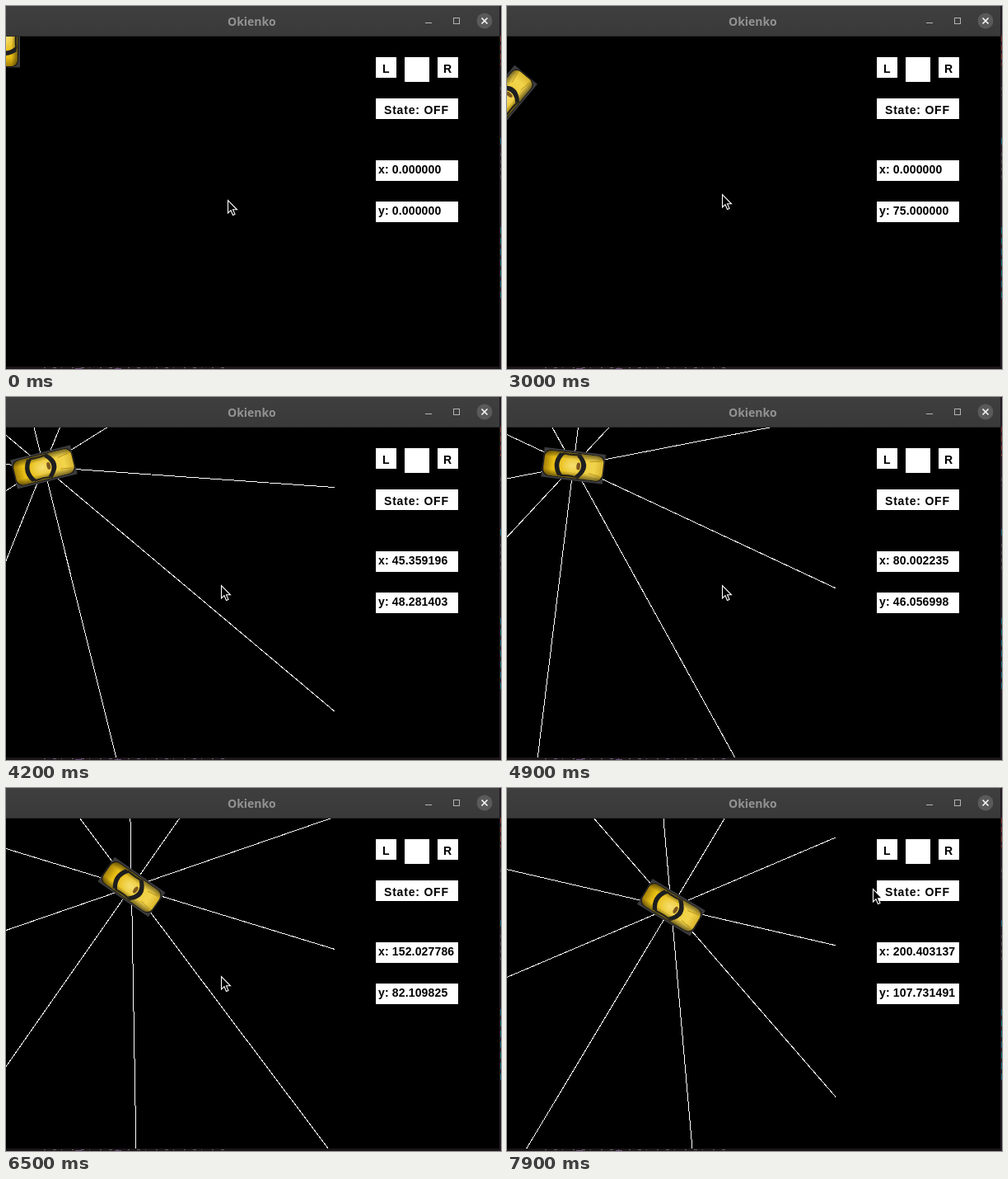
These frames come from a looping animation (601x440 px, 8000 ms). An HTML page:

```html
<!DOCTYPE html>
<html lang="pl">
<head>
<meta charset="utf-8">
<title>Okienko</title>
<style>
  html, body { margin: 0; width: 100%; height: 100%; overflow: hidden; background: #000; }
  svg { display: block; width: 601px; height: 440px; }
  .label { font: bold 14px "Liberation Sans", Arial, sans-serif; letter-spacing: .15px; white-space: pre; }
  .title { font: bold 14px "Open Sans", "Noto Sans", sans-serif; fill: #929292; }
  .crisp { shape-rendering: crispEdges; }
</style>
</head>
<body>
<svg viewBox="0 0 601 440">
  <defs>
    <linearGradient id="bar" x2="0" y2="1">
      <stop stop-color="#3f3f3f"/><stop offset="1" stop-color="#393939"/>
    </linearGradient>
    <linearGradient id="paint" x2="0" y2="1">
      <stop stop-color="#d8b52c"/><stop offset=".15" stop-color="#f2d44c"/>
      <stop offset=".5" stop-color="#ecc832"/><stop offset=".85" stop-color="#e8be14"/>
      <stop offset="1" stop-color="#a58008"/>
    </linearGradient>
    <linearGradient id="shade">
      <stop stop-color="#000" stop-opacity=".5"/><stop offset=".25" stop-color="#000" stop-opacity="0"/>
      <stop offset=".75" stop-color="#000" stop-opacity="0"/><stop offset="1" stop-color="#000" stop-opacity=".5"/>
    </linearGradient>
    <radialGradient id="shine">
      <stop stop-color="#fff2a8" stop-opacity=".55"/><stop offset="1" stop-color="#fff2a8" stop-opacity="0"/>
    </radialGradient>
    <clipPath id="view"><rect y="37" width="599" height="400"/></clipPath>
  </defs>

  <rect width="601" height="440"/>
  <g class="crisp">
    <rect y="437" width="601" height="3" fill="#1c1519"/>
    <rect x="599" width="2" height="440" fill="#241a22"/>
    <path d="M600.500 36v36" stroke="#7c3020" stroke-dasharray="7 4"/>
    <path d="M600.500 98v10M600.500 178v34" stroke="#4a4240" stroke-dasharray="4 5"/>
    <path d="M600.500 160v8M600.500 268v90" stroke="#0c6678" stroke-dasharray="8 5"/>
    <path d="M46 438.5h220" stroke="#67606a" stroke-dasharray="2 9 4 6 1 12"/>
    <path d="M84 439.5h60" stroke="#6b4b78" stroke-dasharray="8 40"/>
  </g>

  <g clip-path="url(#view)">
    <g transform="translate(-1 37)">
      <g id="rays" class="crisp" stroke="#fff"></g>
      <g id="car">
        <rect x="-18" y="-37.5" width="36" height="75" fill="#3b3b3d"/>
        <rect x="-16" y="-37" width="32" height="74" rx="8" fill="#1c1a14"/>
        <rect x="-15" y="-36" width="30" height="72" rx="8" fill="url(#paint)"/>
        <rect x="-15" y="-36" width="30" height="72" rx="8" fill="url(#shade)"/>
        <ellipse cy="2" rx="11" ry="15" fill="url(#shine)"/>
        <path d="M-14 -8Q0 -23 14 -8L12 -3Q0 -16 -12 -3Z" fill="#1d1e20"/>
        <path d="M-13 12Q0 23 13 12L14 18Q0 28 -14 18Z" fill="#1d1e20"/>
        <path d="M-14 -8Q-12 3 -13.500 15M14 -8Q12 3 13.500 15" fill="none" stroke="#24221a" stroke-width="2.2"/>
        <path d="M-9 -32L-7 -19M9 -32L7 -19" stroke="#b68f14" stroke-width=".8"/>
        <ellipse cy="-6" rx="4.5" ry="2.3" fill="#7c561c"/>
      </g>
    </g>
  </g>

  <rect width="599" height="37" fill="url(#bar)"/>
  <path class="crisp" d="M0 36.500h599" stroke="#2a2a2a"/>
  <text class="title" x="269" y="24">Okienko</text>
  <g fill="none" stroke="#b4b4b4" class="crisp">
    <path d="M509 20.500h8"/>
    <rect x="543.5" y="14.5" width="7" height="7"/>
  </g>
  <circle cx="581" cy="18" r="9.5" fill="#5a5a5a"/>
  <path d="M577.500 14.500l7 7m0 -7l-7 7" stroke="#fff" stroke-width="1.5"/>

  <g fill="#fff" class="crisp">
    <rect x="449" y="62" width="25" height="25"/>
    <rect x="484" y="62" width="30" height="30"/>
    <rect x="524" y="62" width="25" height="25"/>
    <rect x="449" y="112" width="100" height="25"/>
    <rect x="449" y="187" width="100" height="25"/>
    <rect x="449" y="237" width="100" height="25"/>
  </g>
  <g class="label">
    <text x="457" y="80.500">L</text>
    <text x="531" y="80.500">R</text>
    <text x="459" y="130.500" style="letter-spacing:.8px">State: OFF</text>
    <text id="xText" x="452" y="202.500"></text>
    <text id="yText" x="452" y="252.500"></text>
  </g>

  <path id="cursor" d="M.5 .5V16L4 12.700L6.500 18.500L9 17.400L6.500 11.800H11.500Z" fill="#000" stroke="#fff" stroke-width="1.1"/>
</svg>

<script>
const LOOP = 8000, STEP = 100, TICK = 100 / 3, SIZE = 400, RAYS = 10;
const byId = id => document.getElementById(id);
const rad = deg => deg * Math.PI / 180;

// time, x, y, rotation clockwise from "up"
const drive = [
  [133, 0, 0, 0],
  [1500, 0, 68.333344, 0],
  [1633, 0, 75, 0],
  [1700, 0, 75, 0],
  [3140, 0, 75, 43.2],
  [4200, 45.359196, 48.281403, 75],
  [5600, 113.363327, 56.029495, 117],
  [5867, 124.75, 62.87, 125],
  [6500, 152.027786, 82.109825, 125],
  [6664, 158.75, 86.82, 125],
  [7062, 176.17, 96.47, 113],
  [7334, 188.69, 101.78, 113],
  [7600, 200.403137, 107.731491, 121]
];

// time, x, y
const pointer = [
  [100, 269, 235], [1400, 264, 233], [2000, 264, 233], [2800, 261, 228],
  [7400, 261, 228], [7900, 444, 122]
];

function segment(table, t) {
  const last = table[table.length - 1];
  if (t <= table[0][0]) return [table[0], table[0], 0];
  if (t >= last[0]) return [last, last, 0];
  const i = table.findIndex(row => row[0] > t);
  const a = table[i - 1], b = table[i];
  return [a, b, (t - a[0]) / (b[0] - a[0])];
}

const mix = (a, b, u) => a + (b - a) * u;

function hermite(a, b, ta, tb, u) {
  const v = 1 - u;
  return a * v * v * (1 + 2 * u) + b * u * u * (3 - 2 * u) + ta * u * v * v - tb * u * u * v;
}

// The car follows its heading, forwards or in reverse.
function carAt(t) {
  const [a, b, u] = segment(drive, t);
  const dx = b[1] - a[1], dy = b[2] - a[2];
  const forward = row => [Math.sin(rad(row[3])), -Math.cos(rad(row[3]))];
  const fa = forward(a), fb = forward(b);
  const speed = Math.hypot(dx, dy) * Math.sign(dx * fa[0] + dy * fa[1]);
  return {
    x: hermite(a[1], b[1], fa[0] * speed, fb[0] * speed, u),
    y: hermite(a[2], b[2], fa[1] * speed, fb[1] * speed, u),
    turn: mix(a[3], b[3], u)
  };
}

const rays = Array.from({ length: RAYS }, () =>
  byId("rays").appendChild(document.createElementNS("http://www.w3.org/2000/svg", "line")));

function drawRays({ x, y, turn }) {
  byId("rays").style.display = x > 0.01 ? "" : "none";
  rays.forEach((line, i) => {
    const angle = rad(turn + i * 360 / RAYS);
    const c = Math.cos(angle), s = Math.sin(angle);
    const reach = Math.min(((c > 0 ? SIZE : 0) - x) / c, ((s > 0 ? SIZE : 0) - y) / s);
    line.setAttribute("x1", x);
    line.setAttribute("y1", y);
    line.setAttribute("x2", x + c * reach);
    line.setAttribute("y2", y + s * reach);
  });
}

function draw(time) {
  const t = Math.floor(time % LOOP / STEP) * STEP;

  // The readout lags the drawn car by one tick.
  const car = carAt(t + TICK), readout = carAt(t);
  drawRays(car);
  byId("car").setAttribute("transform", `translate(${car.x} ${car.y}) rotate(${car.turn})`);
  byId("xText").textContent = "x: " + readout.x.toFixed(6);
  byId("yText").textContent = "y: " + readout.y.toFixed(6);

  const [a, b, u] = segment(pointer, t);
  const px = Math.round(mix(a[1], b[1], u)), py = Math.round(mix(a[2], b[2], u));
  byId("cursor").setAttribute("transform", `translate(${px} ${py})`);
}

const start = performance.now();
function tick() {
  draw(performance.now() - start);
  requestAnimationFrame(tick);
}
tick();
</script>
</body>
</html>
```
